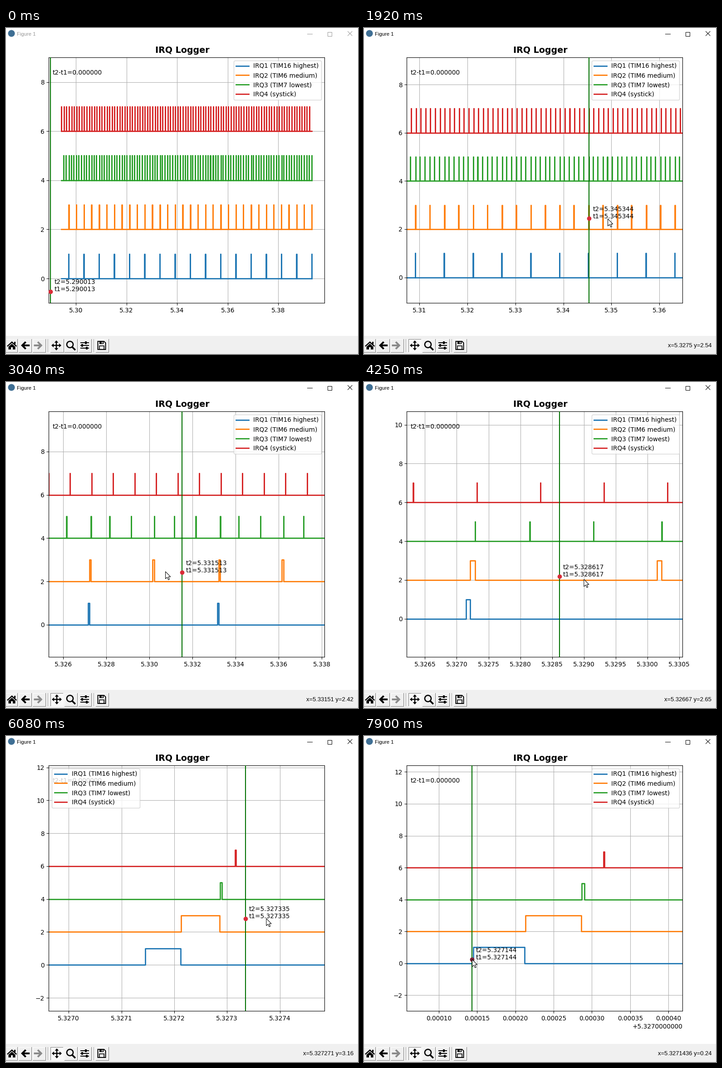
These frames come from a looping animation (776 by 721 pixels, 8 s). A matplotlib script:

```python
import math
import numpy as np
import matplotlib.pyplot as plt
from matplotlib.animation import FuncAnimation
from matplotlib.patches import Circle, Polygon, Rectangle
from matplotlib.ticker import AutoLocator

W, H, DPI = 776, 721, 100
LEFT, TOP, PW, PH = 94.4, 65.2, 607.7, 543.2
BOTTOM = TOP + PH
FRAMES, INTERVAL = 80, 100
PT = 72 / DPI  # points per pixel
plt.rcParams["font.size"] = 9.8

# ---------------------------------------------------------------- signals
T0, T_START, T_END = 5.327145, 5.294286, 5.39329
COLORS = ["#1f77b4", "#ff7f0e", "#2ca02c", "#d62728"]
NAMES = ["IRQ1 (TIM16 highest)", "IRQ2 (TIM6 medium)",
         "IRQ3 (TIM7 lowest)", "IRQ4 (systick)"]
PERIOD = [.006, .003, .001, .001]
WIDTH = [6.7e-5, 7.3e-5, 4e-6, 1.6e-6]


def delay(level, k):
    """Lower priorities wait until the higher ones have finished."""
    if level == 1:
        return 5e-6 if k % 2 else 6.8e-5
    if level == 2:
        return 4e-6 if k % 3 else delay(1, k // 3) + 7.35e-5
    return 1.7e-4 if level == 3 else 0


def wave(level):
    xs, ys = [T_START], [0]
    for k in range(-40, 70):
        a = T0 + PERIOD[level] * k + delay(level, k)
        b = a + WIDTH[level]
        if b > T_START and a < T_END:
            xs += [a, a, b, b]
            ys += [0, 1, 1, 0]
    xs.append(T_END)
    ys.append(0)
    return np.clip(xs, T_START, T_END), np.array(ys) + 2 * level


# ---------------------------------------------------------------- motion
SPEED = 50  # pixels per frame while dragging
# press frame, time and level under the pointer, drag length and rise in pixels
DRAGS = [
    (15.617, 5.32754, 2.54, 281.9, -7.4),
    (22.8, 5.331, 2.72, 283.2, -22.3),
    (36.286, 5.32667, 2.65, 455.3, -41.4),
    (47.015, 5.3270592, 2.57, 322.5, -18.4),
    (58.672, 5.327271, 3.16, 164.6, -12.3),
]
# frame, time and level where the ruler passes
PASSES = [(19, 5.345344, 2.45), (30, 5.331513, 2.42), (42, 5.328617, 2.18),
          (50, 5.327459, 2.24), (60, 5.327335, 2.82),
          (74, 5.3271436, .24), (79, 5.3271436, .24)]
SHOW, CLICK, ENTER, LEAVE, SETTLE = 2, 7, 11, 66, 76
HOME = (5.290013, -.53)


def view(f):
    """Zoom by each drag so far, about the point where it was pressed."""
    xr, yr = np.array([5.289336, 5.398239]), np.array([-1.0, 9.0])
    for start, t, y, length, rise in DRAGS:
        p = np.clip((f - start) * SPEED / length, 0, 1)
        xr = t + (xr - t) * 10 ** (-length * p / PW)
        yr = y + (yr - y) * 10 ** (-rise * p / PH)
    return xr, yr


def to_px(f, t, y):
    (x0, x1), (y0, y1) = view(f)
    return (LEFT + (t - x0) / (x1 - x0) * PW,
            BOTTOM - (y - y0) / (y1 - y0) * PH)


def to_data(f, px, py):
    (x0, x1), (y0, y1) = view(f)
    return (x0 + (px - LEFT) / PW * (x1 - x0),
            y0 + (BOTTOM - py) / PH * (y1 - y0))


def build_path():
    path = [(2, 118, 722), (6, 112, 700), (9, 112, 700)]
    for start, t, y, length, rise in DRAGS:
        x, y = to_px(start, t, y)
        path.append((start, x, y))
        path.append((start + length / SPEED, x + length, y - rise))
    path.append((LEAVE, *path[-1][1:]))
    path += [(f, *to_px(f, t, y)) for f, t, y in PASSES]
    return np.array(sorted(path)).T


PATH = build_path()


def along(f):
    return np.array([np.interp(f, PATH[0], PATH[i]) for i in (1, 2)])


# ---------------------------------------------------------------- window
fig = plt.figure(figsize=(W / DPI, H / DPI), dpi=DPI, facecolor="white")


def pixel_axes(z):
    a = fig.add_axes([0, 0, 1, 1], zorder=z)
    a.set(xlim=(0, W), ylim=(H, 0))
    a.axis("off")
    return a


win, top = pixel_axes(0), pixel_axes(10)


def line(xs, ys, color="black", lw=1, **kw):
    return win.plot(xs, ys, color=color, lw=lw * PT, **kw)[0]


def shape(points, color="black"):
    return win.add_patch(Polygon(points, fc=color, ec="none"))


def box(x, y, w, h, color="black"):
    return win.add_patch(Rectangle((x, y), w, h, fc=color, ec="none"))


def outline(points, lw):
    win.add_patch(Polygon(points, fc="none", ec="black", lw=lw * PT))


# title bar
win.add_patch(Circle((12, 12), 7.5, fc="#3f6f94", ec="none"))
chrome = [
    win.text(24.5, 17, "Figure 1", family="Liberation Sans", size=8.1),
    line([663.5, 674.5], [12.5, 12.5]),
    line([708.5, 717.5, 717.5, 708.5, 708.5], [8.5, 8.5, 17.5, 17.5, 8.5],
         solid_joinstyle="miter"),
    line([753.5, 763], [7.5, 17]),
    line([753.5, 763], [17, 7.5]),
]

# toolbar
box(0, 681, W, 40, "#f0f0f0")


def bevel(x0, x1, light="white", dark="#7c7c7c"):
    y0, y1 = 687.5, 716.5
    return [line([x0, x0, x1], [y1, y0, y0], light),
            line([x0, x1, x1], [y1, y1, y0], dark)]


for x in (-3.5, 27.5, 58.5, 128.5, 159.5, 197.5):
    bevel(x, x + 28.5)
for x in (91.5, 192.5):
    line([x, x], [688, 716], "#a0a0a0")
    line([x + 1, x + 1], [688, 716], "white")

# home
shape([(2, 703), (13, 693), (24, 703), (22.5, 705), (13, 696.5), (3.5, 705)])
shape([(5.5, 705), (13, 698.3), (20.5, 705), (20.5, 711), (15, 711),
       (15, 706), (11, 706), (11, 711), (5.5, 711)])
box(18, 694, 3, 5)
# back and forward
half = [(33, 0), (42, 9), (45, 6.5), (40.5, 2), (52, 2)]
arrow = [(x, 702 - d) for x, d in half]
arrow += [(x, 702 + d) for x, d in half[::-1]]
shape(arrow)
shape([(113.5 - x, y) for x, y in arrow], "#8a8a8a")
# zoom
win.add_patch(Circle((141, 700), 7, fc="none", ec="black", lw=2.6 * PT))
line([146, 151.5], [705.5, 711], lw=3.6)
# sliders
for y, knob in ((696, 176), (702, 168), (708, 178)):
    line([163.5, 182.5], [y, y], lw=2, solid_capstyle="butt")
    box(knob - 2, y - 3, 4, 6)
# save
outline([(202.5, 693), (216, 693), (219.5, 696.5), (219.5, 711),
         (202.5, 711)], 2)
outline([(206, 703), (216, 703), (216, 711), (206, 711)], 1.6)
box(206, 693, 9, 6)
box(211, 694.2, 2.2, 3.6, "#f0f0f0")


def pan_icon(cx, cy=702):
    parts = [line([cx - 8, cx + 8], [cy, cy], lw=2.4),
             line([cx, cx], [cy - 8, cy + 8], lw=2.4)]
    for dx, dy in ((0, -1), (1, 0), (0, 1), (-1, 0)):
        parts.append(shape([(cx + a * dx - b * dy, cy + a * dy + b * dx)
                            for a, b in ((11, 0), (6, 4.3), (6, -4.3))]))
    return parts


pan_up = bevel(97.5, 126.5) + pan_icon(111)
pan_down = [box(97, 687, 29, 29, "#f9f9f9")]
pan_down += bevel(97.5, 125.5, "#7c7c7c", "white") + pan_icon(112)

status = win.text(766, 706, "", ha="right", family="Liberation Sans", size=9.35)
win.text(388.5, 55, "IRQ Logger", ha="center", size=13.7, weight="bold")
offset = win.text(702, 647, "+5.3270000000", ha="right")

# ---------------------------------------------------------------- plot
ax = fig.add_axes([LEFT / W, 1 - BOTTOM / H, PW / W, PH / H], zorder=5)
ax.grid(True)
for i, (name, color) in enumerate(zip(NAMES, COLORS)):
    ax.plot(*wave(i), color=color, lw=2, label=name)
legend = ax.legend(loc="upper right")
ruler = ax.axvline(HOME[0], color="#007000", lw=1.5, zorder=3)
dot, = ax.plot([], [], "o", ms=7, mec="none", zorder=4)
ax.text(.0135, .93, "t2-t1=0.000000", transform=ax.transAxes, zorder=4)
readouts = [(ax.text(0, 0, "", zorder=4.5), name, rise)
            for name, rise in (("t2", 16), ("t1", 0))]

pointer = Polygon([(0, 0)], fc="white", ec="black", lw=.75)
top.add_patch(pointer)
POINTER = np.array([(0, 0), (0, 16), (3.8, 12.5), (6.3, 18.2), (8.8, 17.2),
                    (6.4, 11.6), (11.2, 11.6)])
locator = AutoLocator()


def set_ticks(x0, x1, y0, y1):
    locs = [v for v in locator.tick_values(x0, x1) if x0 <= v <= x1]
    step = locs[1] - locs[0]
    places = max(0, math.ceil(-math.log10(step) - 1e-4))
    scaled = step * 10 ** places
    if abs(scaled - round(scaled)) > .01:
        places += 1
    shifted = step < 9e-5
    base = 5.327 if shifted else 0
    ax.set_xticks(locs, [f"{v - base:.{places}f}" for v in locs])
    ax.set_yticks([v for v in range(-4, 14, 2) if y0 <= v <= y1])
    offset.set_visible(shifted)


def status_at(f, t, y):
    """Coordinates freeze at the press point while dragging."""
    for start, pt, py, length, _ in DRAGS:
        if start < f <= start + length / SPEED:
            f, t, y = start, pt, py
    x0, x1 = view(f)[0]
    places = -math.floor(math.log10((x1 - x0) / PW))
    return f"x={t:.{places}f} y={y:.2f}"


def draw(f):
    xr, yr = view(f)
    set_ticks(*xr, *yr)
    ax.set_xlim(*xr)
    ax.set_ylim(*yr)

    px, py = along(f) if f >= ENTER else to_px(f, *HOME)
    t, y = to_data(f, px, py)
    ruler.set_xdata([t, t])
    dot.set_data([t], [y])
    dot.set_color("#7c1f33" if f >= SETTLE else "#d92c38")
    for item, name, rise in readouts:
        item.set_position(to_data(f, px + 8, py - .4 - rise))
        item.set_text(f"{name}={t:.6f}")
    legend.set_loc("upper left" if 503 < px < 696 else "upper right")

    active = f >= CLICK
    for item in chrome:
        item.set_color("black" if active else "#999999")
    for item in pan_up:
        item.set_visible(not active)
    for item in pan_down:
        item.set_visible(active)
    status.set_text(status_at(f, t, y) if f >= ENTER else "")
    pointer.set_visible(f >= SHOW)
    pointer.set_xy(POINTER + along(f + 1))  # the plot lags one frame behind
    return []


anim = FuncAnimation(fig, draw, frames=FRAMES, interval=INTERVAL,
                     init_func=lambda: draw(0), repeat=True)
plt.show()
```
